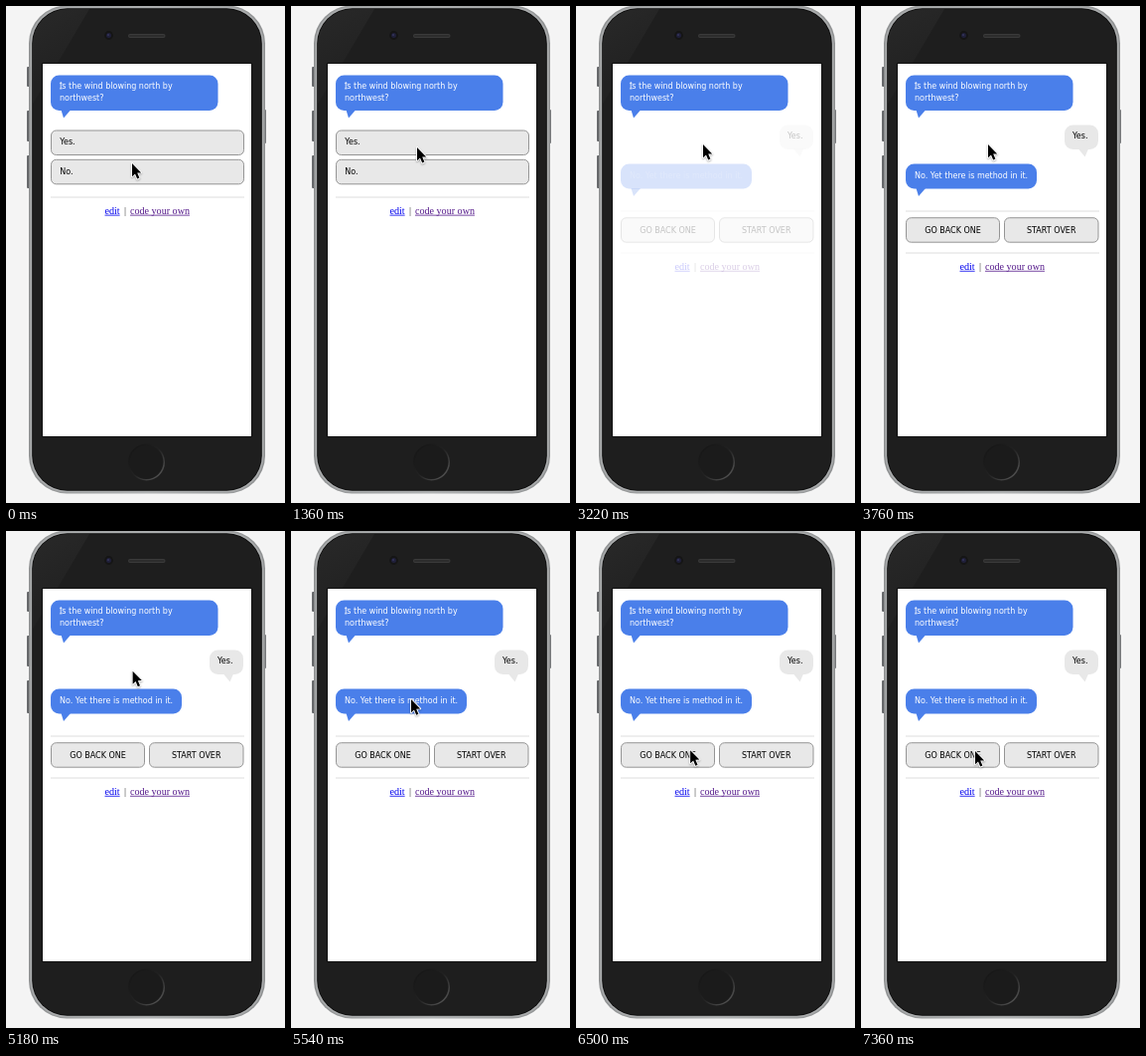
These frames come from a looping animation (281x499 px, 8000 ms). An HTML page with a canvas:

```html
<!DOCTYPE html>
<html lang="en">
<head>
<meta charset="utf-8">
<title>Chat on a phone</title>
<style>
html, body { margin: 0; width: 100%; height: 100%; overflow: hidden; background: #f4f4f4; }
canvas { display: block; width: 281px; height: 499px; }
</style>
</head>
<body>
<canvas id="stage"></canvas>
<script>
const W = 281, H = 499, LOOP = 8000;
const SWAP = 3100, FADE = 560;
const BLUE = '#4a7fea', GREY = '#e8e8e8';
const SANS = '8px "DejaVu Sans", Verdana, sans-serif';
const SERIF = '10.1px "Liberation Serif", Palatino, serif';

const canvas = document.getElementById('stage');
const ctx = canvas.getContext('2d');
const dpr = window.devicePixelRatio || 1;
canvas.width = W * dpr;
canvas.height = H * dpr;

// time, x, y of the pointer tip
const path = [
  [20, 127, 158], [580, 126.5, 143],
  [1100, 126.5, 143], [1360, 127, 142],
  [2340, 127, 142], [2560, 128, 139],
  [5160, 128, 139], [5540, 121, 169], [6080, 118, 204], [6620, 115, 221]
];

function pointerAt(t) {
  if (t <= path[0][0]) return path[0].slice(1);
  for (let i = 1; i < path.length; i++) {
    const [t0, x0, y0] = path[i - 1], [t1, x1, y1] = path[i];
    if (t > t1) continue;
    let k = (t - t0) / (t1 - t0);
    if (t1 === 580 || t1 === 6620) k = 1 - (1 - k) * (1 - k);
    return [x0 + (x1 - x0) * k, y0 + (y1 - y0) * k];
  }
  return path[path.length - 1].slice(1);
}

function box(x, y, w, h, r, fill, stroke, line = 1) {
  ctx.beginPath();
  ctx.roundRect(x, y, w, h, r);
  if (fill) { ctx.fillStyle = fill; ctx.fill(); }
  if (stroke) { ctx.strokeStyle = stroke; ctx.lineWidth = line; ctx.stroke(); }
}

function poly(points, fill) {
  ctx.beginPath();
  points.forEach(([x, y]) => ctx.lineTo(x, y));
  ctx.closePath();
  ctx.fillStyle = fill;
  ctx.fill();
}

function disc(x, y, r, fill) {
  ctx.beginPath();
  ctx.arc(x, y, r, 0, 7);
  ctx.fillStyle = fill;
  ctx.fill();
}

function gradient(x0, y0, x1, y1, ...colors) {
  const g = ctx.createLinearGradient(x0, y0, x1, y1);
  colors.forEach((c, i) => g.addColorStop(i / (colors.length - 1), c));
  return g;
}

function text(s, x, y, color = '#000', font = SANS, align = 'left') {
  ctx.font = font;
  ctx.fillStyle = color;
  ctx.textAlign = align;
  ctx.fillText(s, x, y);
}

function rule(y) {
  ctx.fillStyle = '#dedede';
  ctx.fillRect(45, y, 195, 1);
}

function link(s, x, y, color) {
  text(s, x, y, color, SERIF);
  ctx.fillRect(x, y + 1.2, ctx.measureText(s).width, 0.8);
}

function footer(y) {
  link('edit', 99.5, y, '#0000ee');
  text('|', 119, y, '#333', SERIF);
  link('code your own', 125, y, '#551a8b');
}

function button(x, y, w, label, centered) {
  box(x, y, w, 24.5, 5, GREY, '#959595');
  if (centered) text(label, x + w / 2, y + 15.3, '#000', SANS, 'center');
  else text(label, x + 8.7, y + 14.4);
}

function bubble(x, y, w, h, fill, tail) {
  box(x, y, w, h, 8.5, fill);
  const b = y + h - 0.5;
  poly(tail.map(([dx, dy]) => [x + dx, b + dy]), fill);
}

const leftTail = [[10.5, 0], [20, 0], [13, 8]];
const rightTail = [[14, 0], [24, 0], [20.5, 8]];

function phone() {
  const side = gradient(20, 0, 24, 0, '#77797b', '#55575a');
  [[61, 20], [105, 31], [150, 33]].forEach(([y, h]) => box(21, y, 4, h, 1, side));
  box(258, 104, 4, 34, 1, '#77797b');

  box(23, -0.5, 238, 490, 38, gradient(23, 0, 261, 0, '#8e9091', '#b0b2b3', '#8e9091'));
  box(24.5, 0.8, 235, 487.4, 37, '#a9abac');
  box(26.2, 2.3, 231.6, 484.4, 35.5, '#0d0d0d');
  box(27.2, 3.3, 229.6, 482.4, 34.5, '#1e1e1e');

  ctx.save();
  ctx.beginPath();
  ctx.roundRect(27.2, 3.3, 229.6, 482.4, 34.5);
  ctx.clip();
  poly([[27, 3], [84, 3], [37, 82], [27, 98]], gradient(30, 10, 60, 60, '#282828', '#222222'));
  ctx.restore();

  disc(103.5, 29.5, 4.4, '#151515');
  disc(103.5, 29.5, 2.5, '#20203a');
  disc(103, 29, 1, '#34345c');
  box(123, 28, 37.5, 4, 2, '#3a3a3a');
  box(124, 29, 35.5, 2, 1, '#2d2d2d');

  disc(141.5, 458, 18.5, gradient(128, 445, 155, 471, '#171717', '#222222', '#505050'));
  disc(141.5, 458, 17, '#1b1b1b');

  ctx.fillStyle = '#111';
  ctx.fillRect(36, 57, 212, 376);
  ctx.fillStyle = '#fff';
  ctx.fillRect(37, 58, 210, 374);
}

function question() {
  bubble(45, 69.5, 168.5, 35.5, BLUE, leftTail);
  text('Is the wind blowing north by', 54, 83.3, '#fff');
  // slab ends on the capital I
  ctx.fillRect(53.9, 77.4, 2.6, 0.7);
  ctx.fillRect(53.9, 82.6, 2.6, 0.7);
  text('northwest?', 54, 94.7, '#fff');
}

function choices() {
  button(45.5, 125, 194, 'Yes.');
  button(45.5, 154.3, 194, 'No.');
  rule(191.5);
  footer(208.5);
}

function answer() {
  bubble(205, 119.5, 34, 24.5, GREY, rightTail);
  text('Yes.', 213, 133.4);
  bubble(45, 158.5, 132, 25, BLUE, leftTail);
  text('No. Yet there is method in it.', 54, 172.8, '#fff');
  rule(205.5);
  button(45.5, 212.7, 94, 'GO BACK ONE', true);
  button(144.5, 212.7, 94.5, 'START OVER', true);
  rule(247.5);
  footer(264.6);
}

function pointer(x, y) {
  ctx.save();
  ctx.translate(x, y);
  ctx.beginPath();
  [[0, 0], [0, 13.2], [3, 10.4], [5.2, 15.6], [7.4, 14.6], [5.2, 9.6], [9.2, 9.4]]
    .forEach(([px, py]) => ctx.lineTo(px, py));
  ctx.closePath();
  ctx.lineJoin = 'round';
  ctx.lineWidth = 1.8;
  ctx.strokeStyle = '#fff';
  ctx.shadowColor = 'rgba(0,0,0,.3)';
  ctx.shadowBlur = 2 * dpr;
  ctx.shadowOffsetY = dpr;
  ctx.stroke();
  ctx.shadowColor = 'transparent';
  ctx.fillStyle = '#000';
  ctx.fill();
  ctx.restore();
}

function draw(t) {
  ctx.setTransform(dpr, 0, 0, dpr, 0, 0);
  ctx.fillStyle = '#f4f4f4';
  ctx.fillRect(0, 0, W, H);
  phone();
  question();
  if (t < SWAP) {
    choices();
  } else {
    ctx.globalAlpha = Math.min(1, (t - SWAP) / FADE);
    answer();
    ctx.globalAlpha = 1;
  }
  pointer(...pointerAt(t));
}

const start = performance.now();
function tick() {
  draw((performance.now() - start) % LOOP);
  requestAnimationFrame(tick);
}
tick();
</script>
</body>
</html>
```
